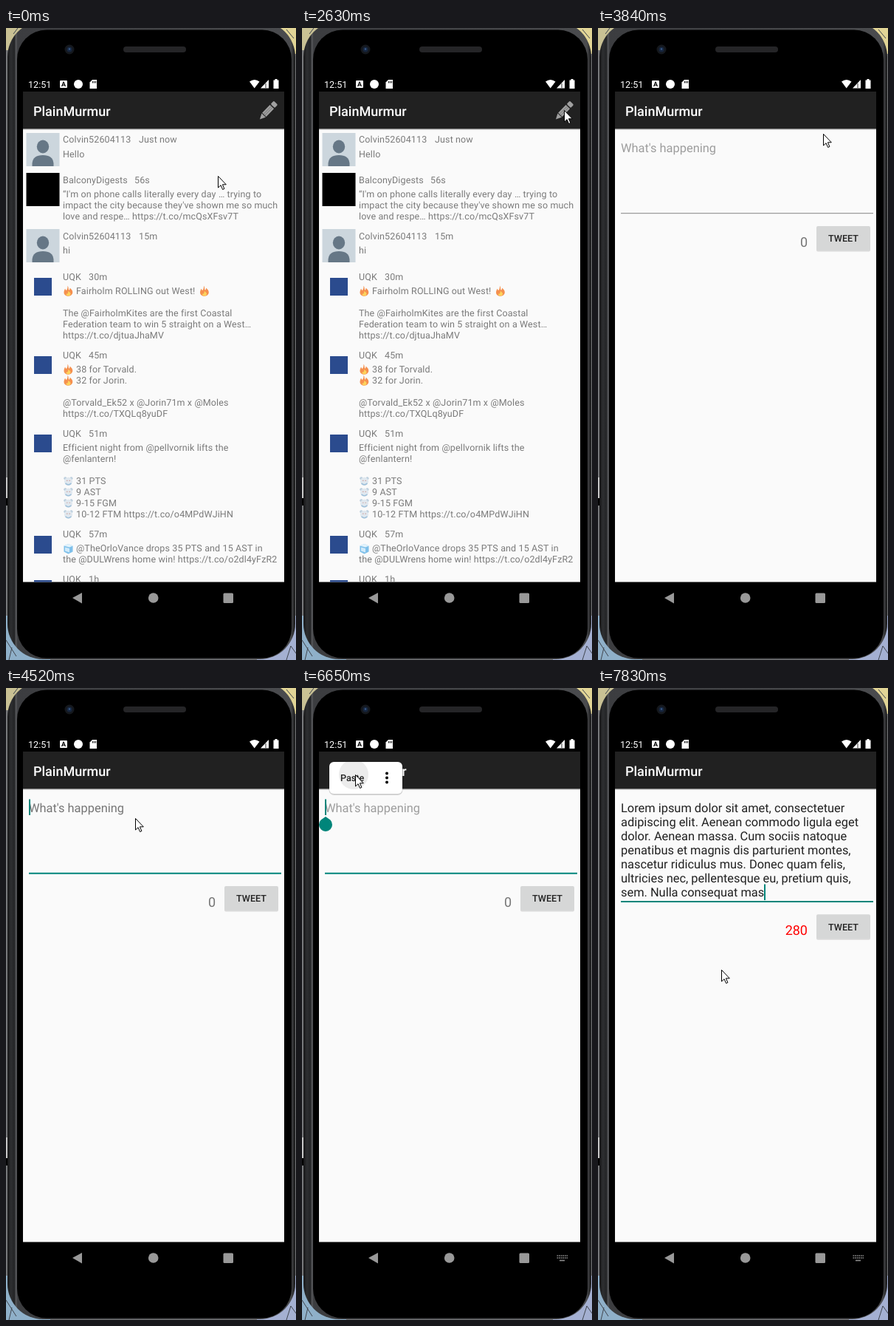
Recreate the animation shown at these times as an HTML page. Size 393 by 855 pixels, loop 8 s.

```html
<!DOCTYPE html>
<html lang="en">
<head>
<meta charset="utf-8">
<title>Compose screen demo</title>
<style>
html, body { margin: 0; width: 100%; height: 100%; overflow: hidden; background: #000; }
svg { display: block; width: 393px; height: 855px; font-family: Roboto, sans-serif; text-rendering: geometricPrecision; }
.title { font-size: 18px; font-weight: 500; fill: #fff; }
.feed { font-size: 12.5px; letter-spacing: .13px; fill: #7a7a7a; }
.edit { font-size: 16.4px; fill: #212121; }
.label { font-size: 12.6px; font-weight: 500; fill: #212121; }
text { white-space: pre; }
</style>
</head>
<body>
<svg viewBox="0 0 393 855">
<defs>
  <linearGradient id="rim">
    <stop offset="0" stop-color="#161617"/><stop offset=".012" stop-color="#2e2f31"/>
    <stop offset=".024" stop-color="#232426"/><stop offset=".03" stop-color="#58595c"/>
    <stop offset=".035" stop-color="#3c3d40"/><stop offset=".985" stop-color="#4a4b4e"/>
    <stop offset="1" stop-color="#161617"/>
  </linearGradient>
  <linearGradient id="drop" x2="0" y2="1">
    <stop offset="0" stop-color="#000" stop-opacity=".4"/><stop offset="1" stop-color="#000" stop-opacity="0"/>
  </linearGradient>
  <clipPath id="screen"><rect x="23" y="71" width="354" height="694"/></clipPath>
  <clipPath id="list"><rect x="23" y="136" width="354" height="613.5"/></clipPath>
  <clipPath id="card"><rect x="37" y="100" width="99" height="43" rx="6"/></clipPath>
  <g id="bar">
    <rect x="23" y="86" width="354" height="50.300" fill="#212121"/>
    <rect x="23" y="136" width="354" height="2.500" fill="url(#drop)"/>
    <text class="title" x="37" y="119">PlainMurmur</text>
  </g>
  <g id="person">
    <rect width="45" height="45" fill="#ccd6dd"/>
    <ellipse cx="22.500" cy="18.500" rx="8.200" ry="9" fill="#667786"/>
    <path d="M8 45V41Q9 30 22.500 30T37 41V45Z" fill="#667786"/>
  </g>
  <rect id="dark" width="45" height="45" fill="#000"/>
  <rect id="blue" x="10.5" y="11" width="24" height="24" fill="#2b4b8e"/>
  <g id="fire">
    <path d="M6 0C8 3 6.500 4 8 6C9 5 9 4 9 3C12 5 13.500 8 12.500 10.500C11.500 13 9 14 7 14C4 14 1 12.500 1 9C1 6.500 2 5.500 2.500 4C3.500 5 3.500 5.500 4 6.500C6 4.500 6 2 6 0Z" fill="#f5904f"/>
    <path d="M7 7C8 8.500 10 9 10 11C10 13 8.500 13.700 7 13.700C5 13.700 3.700 12.500 4 10.500C4.500 11 5 11 5.500 11C6.800 10 6.500 8 7 7Z" fill="#fdd35c"/>
  </g>
  <g id="face">
    <circle cx="2.800" cy="3.500" r="2" fill="#bccfde"/><circle cx="11" cy="3.500" r="2" fill="#bccfde"/>
    <circle cx="7" cy="7.500" r="5.500" fill="#e0e8ef"/>
    <path d="M3 10Q7 14 11 10" fill="none" stroke="#9fc0da" stroke-width="1.500"/>
    <path d="M4.500 6.500h1.500M8 6.500h1.500" stroke="#d0a5a2" stroke-width="1.200"/>
  </g>
  <g id="cube">
    <path d="M1 3L7 .5L13 3V11L7 14L1 11Z" fill="#7fc0ea"/>
    <path d="M1 3L7 .5L13 3L8.500 5Z" fill="#e2f3fc"/>
    <path d="M2.500 5L8.500 6.500V12L2.500 10Z" fill="#d0eafa"/>
  </g>
</defs>

<!-- backdrop and handset -->
<rect width="393" height="855" fill="#77787a"/>
<rect width="45" height="30" fill="#c9c194"/><rect x="345" width="48" height="35" fill="#e2d596"/>
<rect y="795" width="60" height="60" fill="#8fb0c9"/><rect x="340" y="795" width="53" height="60" fill="#a4b0d2"/>
<path d="M0 828L14 850M4 855L8 838M380 855L386 836L393 846M16 0L10 8M380 2L390 14" stroke="#40464f" fill="none"/>
<path d="M1 608v28" stroke="#c5c5c5" stroke-width="2"/><path d="M1 636v10" stroke="#000" stroke-width="2"/>
<rect x="2" y="-9" width="390" height="863" rx="48" fill="url(#rim)"/>
<rect x="15" y="2.500" width="372" height="850" rx="40" fill="#000"/>
<circle cx="86" cy="29" r="6.500" fill="#15181d"/><circle cx="86" cy="29" r="3.500" fill="#16263f"/><circle cx="86" cy="28.500" r="1.300" fill="#3a5a88"/>
<rect x="159" y="25" width="85" height="8" rx="4" fill="#252527"/>

<g clip-path="url(#screen)">
  <g id="home">
    <rect x="23" y="66" width="354" height="720"/>
    <rect x="23" y="86" width="354" height="663.500" fill="#fafafa"/>
    <g id="rows" class="feed" clip-path="url(#list)"></g>
    <use href="#bar"/>
    <circle id="tap" cx="355.500" cy="111" fill="#fff" opacity=".14"/>
    <g transform="translate(344 123.500) rotate(-46)" fill="#a0a0a0">
      <path d="M0 0L7.500 -3.800V3.800Z"/><rect x="8.500" y="-3.800" width="15" height="7.600"/><rect x="25" y="-3.800" width="6" height="7.600" rx="1.500"/>
      <path d="M8.500 -1.200h15M8.500 1.200h15" stroke="#6d6d6d" stroke-width=".8"/>
    </g>
    <rect id="dim" x="23" y="66" width="354" height="720" opacity=".3"/>
  </g>
  <g id="compose">
    <rect x="23" y="66" width="354" height="720"/>
    <rect x="23" y="86" width="354" height="663.500" fill="#fafafa"/>
    <use href="#bar"/>
    <text id="hint" class="edit" x="31" y="167.600">What's happening</text>
    <g id="body" class="edit"></g>
    <g id="lower">
      <path id="line" d="M31 250.700H373"/>
      <text id="count" x="284" y="295.500" font-size="18" text-anchor="end"></text>
      <rect x="296" y="269.500" width="73" height="33" rx="2" fill="#000" opacity=".13"/>
      <rect x="296" y="268" width="73" height="32.500" rx="2" fill="#d6d7d7"/>
      <text class="label" x="332.500" y="289.300" text-anchor="middle">TWEET</text>
    </g>
    <rect id="caret" width="2" height="21.500" fill="#00857a"/>
    <path id="handle" d="M32 174L38.400 178.600A9 9 0 1 1 25.600 178.600Z" fill="#00857a"/>
    <g id="popup">
      <rect x="36.500" y="101" width="100" height="44" rx="7" opacity=".16"/>
      <rect x="37" y="100" width="99" height="43" rx="6" fill="#fff"/>
      <circle id="press" cx="70" cy="117" fill="#ececec" clip-path="url(#card)"/>
      <text class="label" x="52" y="126">Paste</text>
      <circle cx="115" cy="115.500" r="2"/><circle cx="115" cy="121.500" r="2"/><circle cx="115" cy="127.500" r="2"/>
    </g>
  </g>
</g>

<!-- status and navigation bars -->
<g fill="#fff">
  <text x="30" y="80.500" font-size="12.600">12:51</text>
  <rect x="73" y="71" width="10" height="10" rx="1"/>
  <text x="78" y="79.300" font-size="9" font-weight="700" text-anchor="middle" style="fill:#000">A</text>
  <circle cx="98" cy="76" r="6"/>
  <path d="M117 70H123V82H113.500V73.500Z"/><path d="M117.500 72v2.500M119.500 72v2.500M121.500 72v2.500" stroke="#000"/>
  <path d="M330 72.500Q336.700 67.500 343.500 72.500L336.700 81.500Z"/>
  <path d="M356 70V81.500H345Z"/><path d="M352 75v6" stroke="#000" stroke-width=".8"/>
  <path d="M364.500 69h3v1.500h2V82h-7V70.500h2Z"/>
</g>
<g fill="#999">
  <path d="M90 771L103 764V778.500Z"/><circle cx="199.700" cy="771" r="6.800"/><rect x="294.500" y="764.500" width="13.500" height="13.500" rx="1.500"/>
  <g id="keys" stroke="#8d8d8d" fill="none" stroke-width="1.600">
    <path d="M345.500 768h14.500M345.500 771h14.500" stroke-dasharray="1.700 .9"/><path d="M349 774.500h7"/>
  </g>
</g>
<path id="mouse" d="M.5 .5V16L4.100 12.700L6.600 18.500L8.900 17.500L6.400 11.800H11.300Z" fill="#fff" stroke="#000"/>
</svg>

<script>
const LOOP = 8000, LINE = 14.95;
const $ = id => document.getElementById(id);
const put = (parent, name, attrs, text) => {
  const el = document.createElementNS("http://www.w3.org/2000/svg", name);
  for (const k in attrs) el.setAttribute(k, attrs[k]);
  if (text) el.textContent = text;
  return parent.appendChild(el);
};
const set = (id, attrs) => { for (const k in attrs) $(id).setAttribute(k, attrs[k]); };
const show = (id, on) => set(id, { visibility: on ? "visible" : "hidden" });

// baseline, avatar, name, age, age x, body lines
const posts = [
  [155.4, "person", "Colvin52604113", "Just now", 180, ["Hello"]],
  [209.8, "dark", "BalconyDigests", "56s", 174, [
    "“I'm on phone calls literally every day … trying to",
    "impact the city because they've shown me so much",
    "love and respe… https://t.co/mcQsXFsv7T"]],
  [285.7, "person", "Colvin52604113", "15m", 180, ["hi"]],
  [340.5, "blue", "UQK", "30m", 112, [
    "^Fairholm ROLLING out West!", "",
    "The @FairholmKites are the first Coastal",
    "Federation team to win 5 straight on a West…",
    "https://t.co/djtuaJhaMV"]],
  [446.6, "blue", "UQK", "45m", 112, [
    "^38 for Torvald.", "^32 for Jorin.", "",
    "@Torvald_Ek52 x @Jorin71m x @Moles",
    "https://t.co/TXQLq8yuDF"]],
  [552.8, "blue", "UQK", "51m", 112, [
    "Efficient night from @pellvornik lifts the", "@fenlantern!", "",
    "~31 PTS", "~9 AST", "~9-15 FGM", "~10-12 FTM https://t.co/o4MPdWJiHN"]],
  [689.2, "blue", "UQK", "57m", 112, [
    "#@TheOrloVance drops 35 PTS and 15 AST in",
    "the @DULWrens home win! https://t.co/o2dl4yFzR2"]],
  [749.8, "blue", "UQK", "1h", 112, []]
];
const icons = { "^": "fire", "~": "face", "#": "cube" };
const rows = $("rows");
const icon = (name, x, y) => put(rows, "use", { href: "#" + name, transform: `translate(${x} ${y})` });
for (const [y, avatar, name, age, ageX, lines] of posts) {
  icon(avatar, 27.5, Math.round(y - 13.4));
  put(rows, "text", { x: 77, y }, name);
  put(rows, "text", { x: ageX, y }, age);
  lines.forEach((line, i) => {
    const ly = y + 19.2 + i * LINE, mark = icons[line[0]];
    if (mark) icon(mark, 77.5, ly - 11);
    put(rows, "text", { x: mark ? 95 : 77, y: ly }, mark ? line.slice(1) : line);
  });
}
icon("fire", 262, 348.7);

const lorem = [
  "Lorem ipsum dolor sit amet, consectetuer",
  "adipiscing elit. Aenean commodo ligula eget",
  "dolor. Aenean massa. Cum sociis natoque",
  "penatibus et magnis dis parturient montes,",
  "nascetur ridiculus mus. Donec quam felis,",
  "ultricies nec, pellentesque eu, pretium quis,",
  "sem. Nulla consequat mas"
];
lorem.forEach((line, i) => put($("body"), "text", { x: 31, y: 167.6 + i * 19.05 }, line));

// step tables: time, value...
const mouse = [
  [0, 287, 200], [120, 283, 186], [240, 279, 176], [490, 287, 184], [640, 288, 187], [760, 289, 189],
  [1010, 309, 310], [1130, 316, 384], [1280, 318, 412], [1840, 240, 240], [1960, 141, 82],
  [2110, 111, 77], [2230, 371, 110], [2390, 366, 111], [2510, 359, 111], [2630, 355, 111],
  [3720, 345, 120], [3840, 305, 143], [3960, 262, 161], [4100, 238, 171], [4250, 184, 178],
  [4400, 175, 176], [4640, 171, 176], [4760, 167, 176], [4920, 63, 163], [5070, 65, 163],
  [6260, 67, 150], [6380, 70, 130], [6500, 72, 117],
  [6920, 90, 160], [7040, 130, 270], [7160, 158, 350], [7280, 165, 381], [7430, 167, 381]
];
const zoom = [[0, .988], [3600, .996], [3720, .999], [3840, 1]];
const tapSize = [[0, 0], [3150, 13.5], [3300, 18]];
const caretOn = [[0, 0], [4520, 1], [5070, 0], [5620, 1], [6010, 0], [6380, 1], [7280, 0], [7830, 1]];
const pressed = [[0, 0], [4400, 1], [4640, 0], [5070, 1], [5620, 0]];
const popupFade = [[0, 0], [5620, .35], [5740, .75], [5890, .95], [6010, 1], [6800, .5], [6920, 0]];
const pressSize = [[0, 0], [6650, 20], [6800, 45]];

const at = (table, t) => table.findLast(step => step[0] <= t);
const val = (table, t) => at(table, t)[1];
const scale = s => `translate(200 417.5) scale(${s}) translate(-200 -417.5)`;

function draw(t) {
  const writing = t >= 3450, settled = t >= 3840, focus = t >= 4520, pasted = t >= 6800;
  const [, x, y] = at(mouse, t);
  set("mouse", { transform: `translate(${x} ${y})` });
  set("tap", { r: val(tapSize, t) });
  show("home", !settled);
  set("home", { transform: scale(writing ? 1.054 : 1) });
  show("dim", writing && !settled);
  $("compose").style.display = writing ? "" : "none";
  set("compose", { transform: scale(val(zoom, t)) });
  show("hint", !pasted);
  $("hint").style.fill = val(pressed, t) ? "#757575" : "#9d9d9d";
  show("body", pasted);
  set("lower", { transform: `translate(0 ${pasted ? 38.3 : 0})` });
  set("line", { stroke: focus ? "#00857a" : "#858585", "stroke-width": focus ? 1.9 : 1 });
  $("count").textContent = pasted ? "280" : "0";
  set("count", { fill: pasted ? "#f00" : "#757575" });
  set("caret", { x: pasted ? 225 : 31, y: pasted ? 265.5 : 150.5 });
  show("caret", val(caretOn, t));
  show("handle", t >= 5620 && !pasted);
  set("popup", { opacity: val(popupFade, t) });
  set("press", { r: val(pressSize, t) });
  show("keys", t >= 4760);
}

const start = performance.now();
function tick(now) {
  draw(Math.max(0, now - start) % LOOP);
  requestAnimationFrame(tick);
}
draw(0);
requestAnimationFrame(tick);
</script>
</body>
</html>
```
